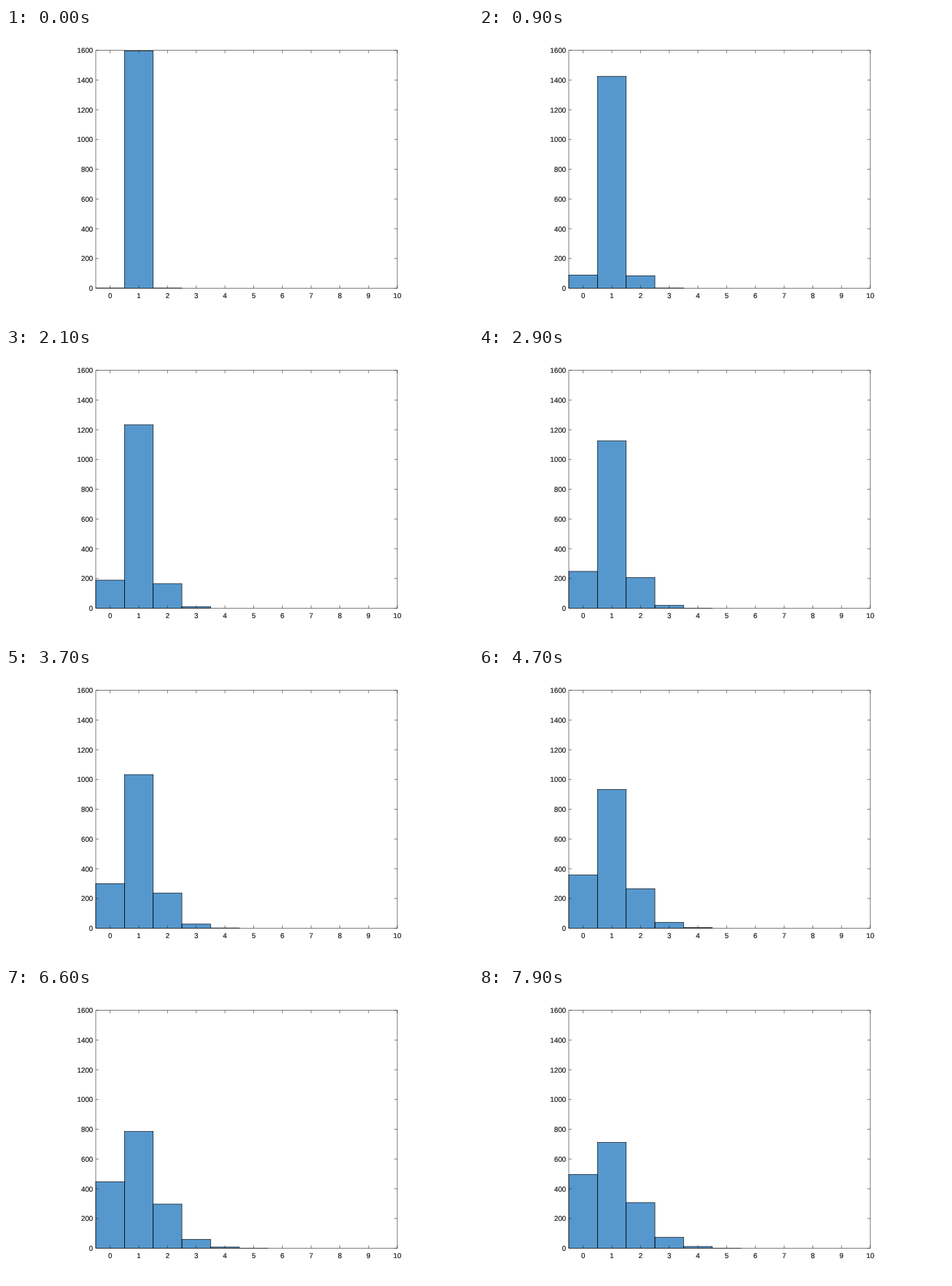
An HTML page with a canvas that plays this animation: 640 px wide and 400 px high, repeating every 8 s.

```html
<!DOCTYPE html>
<html lang="en">
<head>
<meta charset="utf-8">
<title>Histogram</title>
<style>
html, body { margin: 0; width: 100%; height: 100%; overflow: hidden; background: #fff; }
canvas { display: block; }
</style>
</head>
<body>
<canvas id="stage" width="640" height="400"></canvas>
<script>
const ctx = document.getElementById('stage').getContext('2d');
const LOOP = 8000, STEP = 100;
const L = 123, R = 536.2, T = 30.5, B = 356.5;
const binW = (R - L) / 10.5;

// Every holder starts with one token. A move takes a token from a random
// non-empty holder and gives it to any holder; the mean counts are tracked.
const HOLDERS = 1600, BINS = 11;
const FIRST_MOVES = 2, MOVES_PER_STEP = 10.2;

function move(counts, amount) {
  const give = amount / (HOLDERS - counts[0]);
  const get = amount / HOLDERS;
  return counts.map((c, n) => {
    const above = counts[n + 1] || 0, below = counts[n - 1] || 0;
    const lost = n > 0 ? c * give : 0;
    return c + above * give - lost + (below - c) * get;
  });
}

function simulate() {
  let counts = Array.from({ length: BINS }, (_, n) => n === 1 ? HOLDERS : 0);
  const states = [];
  for (let i = 0; i < LOOP / STEP; i++) {
    const moves = i === 0 ? FIRST_MOVES : MOVES_PER_STEP;
    for (let k = 0; k < 10; k++) counts = move(counts, moves / 10);
    states.push(counts.map(Math.round));
  }
  return states;
}

const states = simulate();
const yOf = v => B - (B - T) * v / HOLDERS;
const xOf = n => L + (n + 0.5) * binW;

function line(x0, y0, x1, y1) {
  ctx.moveTo(x0, y0);
  ctx.lineTo(x1, y1);
}

function label(text, x, y) {
  ctx.fillText(text, x, y);
  ctx.strokeText(text, x, y);
}

function drawBars(counts) {
  const bars = counts.filter(v => v > 0);
  ctx.fillStyle = '#5698ce';
  ctx.strokeStyle = '#000';
  ctx.lineWidth = 0.65;
  bars.forEach((v, i) => ctx.fillRect(L + i * binW, yOf(v), binW, B - yOf(v)));
  bars.forEach((v, i) => ctx.strokeRect(L + i * binW, yOf(v), binW, B - yOf(v)));
}

function drawAxes() {
  const tick = 4;
  ctx.strokeStyle = '#262626';
  ctx.lineWidth = 0.6;
  ctx.beginPath();
  ctx.rect(L, T, R - L, B - T);
  for (let n = 0; n <= 10; n++) {
    line(xOf(n), B, xOf(n), B - tick);
    line(xOf(n), T, xOf(n), T + tick);
  }
  for (let v = 0; v <= HOLDERS; v += 200) {
    line(L, yOf(v), L + tick, yOf(v));
    line(R, yOf(v), R - tick, yOf(v));
  }
  ctx.stroke();
}

function drawLabels() {
  ctx.font = '9.8px "Liberation Sans", Arial, sans-serif';
  ctx.textRendering = 'geometricPrecision';
  ctx.fillStyle = ctx.strokeStyle = '#1a1a1a';
  ctx.lineWidth = 0.2;
  ctx.textAlign = 'center';
  for (let n = 0; n <= 10; n++) label(n, xOf(n), 369.5);
  ctx.textAlign = 'right';
  for (let v = 0; v <= HOLDERS; v += 200) label(v, 119.3, yOf(v) + 3.6);
}

let start = null;
function frame(now) {
  if (start === null) start = now;
  const step = Math.floor(((now - start) % LOOP) / STEP);
  ctx.fillStyle = '#fff';
  ctx.fillRect(0, 0, 640, 400);
  drawBars(states[step]);
  drawAxes();
  drawLabels();
  requestAnimationFrame(frame);
}
requestAnimationFrame(frame);
</script>
</body>
</html>
```
